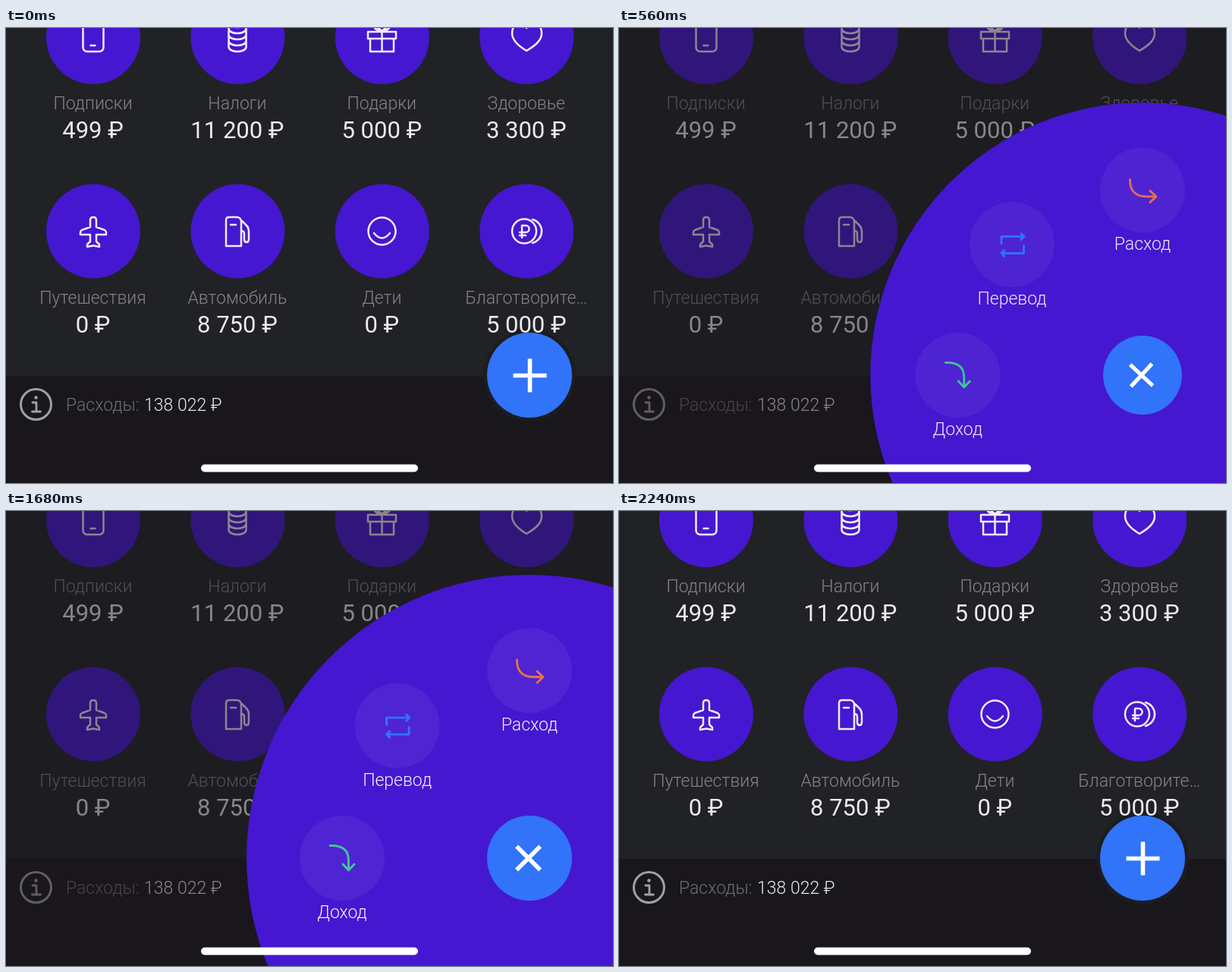
Recreate the animation shown at these times as an HTML page with a canvas. Size 800 px wide and 599 px high, loop 2280 ms.

```html
<!DOCTYPE html>
<html lang="ru">
<head>
<meta charset="utf-8">
<title>Меню операций</title>
<style>
html, body { margin: 0; width: 100%; height: 100%; overflow: hidden; background: #19171c; }
canvas { display: block; width: 800px; height: 599px; }
</style>
</head>
<body>
<canvas id="stage" width="800" height="599"></canvas>
<script>
const ctx = document.getElementById('stage').getContext('2d');
const LOOP = 2280, STEP = 40, OPEN_AT = 344, CLOSE_AT = 1936;
const PURPLE = '#4517d0', BLUE = '#3173f9';
const FAB = { x: 690, y: 457, r: 56 };

const categories = [
  ['Подписки', '499 ₽', 'M101.5-10V25q0 6 6 6H122.5q6 0 6-6V-10M111.5 23h6'],
  ['Налоги', '11 200 ₽', 'M293.5-8V25M316.5-8V25' + [-7, 1, 9, 17, 25].map(y => `M293.5 ${y}c1 8 22 8 23 0`).join('')],
  ['Подарки', '5 000 ₽', 'M477 5H514V14H477ZM480 14V31H511V14M495.5 5V31M495.5 4C482 3 483-8 495.5 4C508-8 509 3 495.5 4'],
  ['Здоровье', '3 300 ₽', 'M686 30C676 24 667 17 667 7C667-8 682-8 686 0C690-8 706-8 706 7C706 17 696 24 686 30Z'],
  ['Путешествия', '0 ₽', 'M111 262V253q0-4 4-4t4 4V262l11 4q2 1 2 3v3H119v9l4 4v3l-8-1.5-8 1.5v-3l4-4v-9H98v-3q0-2 2-3Z'],
  ['Автомобиль', '8 750 ₽', 'M290 287V253q0-4 4-4H304q5 0 6 5V287ZM296 259h7M311 254l6 6q3 3 3 8V278q0 4-3 4t-3-4V271q0-4-4-4'],
  ['Дети', '0 ₽', 'M477.5 267.5a18 18 0 1 0 36 0a18 18 0 1 0-36 0M485 270q10.5 13 21 0'],
  ['Благотворите…', '5 000 ₽', 'M667 267.5a16 16 0 1 0 32 0a16 16 0 1 0-32 0M694 252a16 16 0 0 1 0 31M680 276V260h5a4.5 4.5 0 0 1 0 9h-8M677 273h8']
];

// Direction from the button, label, colour, icon
const actions = [
  [0, -1, 'Расход', '#e9724b', 'M-16.5-14C-17 1-9 8 4 8.5H17.5M10 1L18 8.5L10 16'],
  [-.706, -.706, 'Перевод', '#2f74fb', 'M-14-1V-10.5H16M12-14.5L16-10.5L12-6.5M15.5 2V11.5H-14M-10 7.5L-14 11.5L-10 15.5'],
  [-1, 0, 'Доход', '#40c795', 'M-16-16.5C3-17 8.5-9 8.5 4V15M1 8L8.5 16L16 8']
];

const clamp = v => Math.min(1, Math.max(0, v));
const ease = u => (1 - Math.cos(Math.PI * clamp(u))) / 2;

function disc(x, y, r, color) {
  ctx.fillStyle = color;
  ctx.beginPath();
  ctx.arc(x, y, r, 0, 7);
  ctx.fill();
}

function stroke(path, color, width) {
  ctx.strokeStyle = color;
  ctx.lineWidth = width;
  ctx.stroke(new Path2D(path));
}

function text(str, x, y, color, size = 23, weight = 300, align = 'center') {
  ctx.font = `${weight} ${size}px Roboto, sans-serif`;
  ctx.textAlign = align;
  ctx.fillStyle = color;
  ctx.fillText(str, x, y);
}

function drawList() {
  ctx.fillStyle = '#212226';
  ctx.fillRect(0, 0, 800, 458);
  ctx.fillStyle = '#19171c';
  ctx.fillRect(0, 458, 800, 141);
  disc(FAB.x, FAB.y, 61, '#1c1c21');

  categories.forEach(([name, sum, icon], i) => {
    const x = 115 + (i % 4) * 190.4, y = i < 4 ? 12 : 267.5;
    disc(x, y, 62, PURPLE);
    stroke(icon, '#f0edfa', 2.5);
    text(name, x - .5, y + 95, '#848488');
    text(sum, x - .5, y + 133, '#ececee', 31, 400);
  });

  stroke('M19.5 495.5a20 20 0 1 0 40 0a20 20 0 1 0-40 0', '#a0a0a2', 3);
  stroke('M35 493H40V505M34.5 505H45.5', '#a0a0a2', 2.8);
  disc(39.5, 486.5, 2.3, '#a0a0a2');
  text('Расходы:', 79, 503.5, '#6f6d73', 23, 300, 'left');
  text('138 022 ₽', 182, 503.5, '#ececee', 23, 300, 'left');
}

function drawActions(spread, alpha) {
  for (const [dx, dy, label, color, icon] of actions) {
    ctx.save();
    ctx.globalAlpha = alpha;
    ctx.translate(FAB.x + dx * spread, FAB.y + dy * spread);
    disc(0, 0, FAB.r, 'rgba(255,255,255,.055)');
    stroke(icon, color, 2.9);
    text(label, 0, 79, '#f4f2fc');
    ctx.restore();
  }
}

function drawFab(scale, turn) {
  disc(FAB.x, FAB.y, FAB.r * scale, BLUE);
  ctx.save();
  ctx.translate(690.5 - 2 * turn, 457.5 - .5 * turn);
  ctx.rotate(turn * Math.PI / 4);
  ctx.scale(scale, scale);
  ctx.lineCap = 'butt';
  stroke('M-22 0H22M0-22V22', '#fff', 5.6);
  ctx.restore();
}

function draw(t) {
  // Progress of a part that goes out on the first tap and back on the second
  const toggle = (delay, span) =>
    ease((t - OPEN_AT - delay) / span) - ease((t - CLOSE_AT - delay) / span);
  const press = start => Math.sin(Math.PI * clamp((t - start) / 235));

  const grow = toggle(0, 250);
  const spread = 247 * toggle(-21, 256);
  const dim = toggle(50, 150);
  const scale = 1 - .29 * (press(OPEN_AT) + press(CLOSE_AT));

  ctx.lineCap = ctx.lineJoin = 'round';
  drawList();
  ctx.fillStyle = `rgba(25,22,29,${.48 * dim})`;
  ctx.fillRect(0, 0, 800, 599);

  ctx.globalAlpha = clamp(grow * 8);
  disc(FAB.x, FAB.y, 56 + 317 * grow, PURPLE);
  ctx.globalAlpha = 1;
  drawActions(spread, grow);
  drawFab(scale, grow);

  ctx.fillStyle = '#fff';
  ctx.beginPath();
  ctx.roundRect(257, 574.5, 286, 10, 5);
  ctx.fill();
}

const begin = performance.now();
function tick() {
  const t = (performance.now() - begin) % LOOP;
  draw(Math.floor(t / STEP) * STEP);
  requestAnimationFrame(tick);
}
tick();
</script>
</body>
</html>
```
